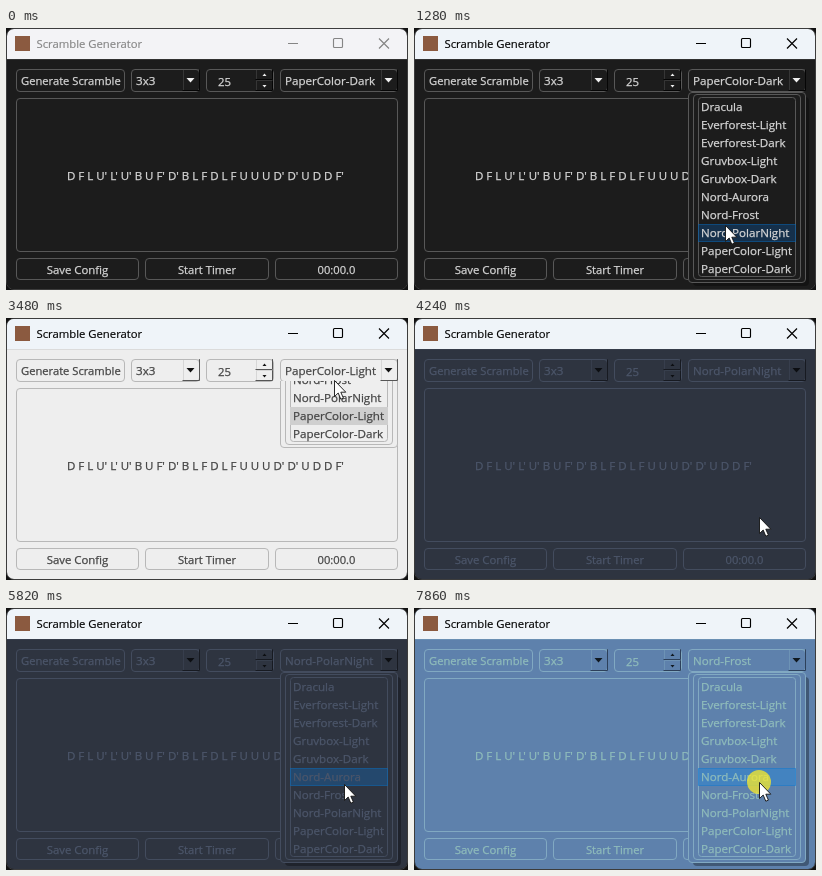
An HTML page for the animation above (8 s loop, 402 by 262 pixels).

```html
<!DOCTYPE html>
<html lang="en">
<head>
<meta charset="utf-8">
<title>Scramble Generator</title>
<style>
  html, body { margin: 0; width: 100%; height: 100%; overflow: hidden; background: #111; }
  svg { display: block; width: 402px; height: 262px; }
  text { font: 11.4px "Open Sans", "Noto Sans", sans-serif; fill: var(--text);
    stroke: var(--text); stroke-width: .25px; white-space: pre; }
  .combo { font-size: 11.6px; }
  .small { font-size: 11.2px; }
  .mid { text-anchor: middle; }
  .frame { fill: var(--bg); stroke: var(--border); }
  .bevel { fill: none; stroke: var(--bevel); }
  .arrow { fill: var(--arrow); }
  #caption { font-size: 11.3px; fill: var(--chrome); stroke: var(--chrome); stroke-width: .15px; }
  #controls { fill: none; stroke: var(--chrome); stroke-width: 1.15px; }
</style>
</head>
<body>
<svg id="stage" viewBox="0 0 402 262"></svg>
<script>
const LOOP = 8000;
const ITEMS = ["Dracula", "Everforest-Light", "Everforest-Dark", "Gruvbox-Light", "Gruvbox-Dark",
  "Nord-Aurora", "Nord-Frost", "Nord-PolarNight", "PaperColor-Light", "PaperColor-Dark"];
const ROW = 18, LIST_TOP = 70, POPUP_TOP = 64, POPUP_HEIGHT = 193, ROLL_MS = 145, FOCUS_AT = 730;

// hover: row under the pointer; current: selected row before the pointer reaches the list
const THEMES = [
  { at: 0, item: 9, bg: "#1c1c1c", text: "#d6d6d6", border: "#585858", bevel: "#050505", arrow: "#f0f0f0", hover: "#15304b", current: "#303030" },
  { at: 1830, item: 8, bg: "#eeeeee", text: "#444444", border: "#b8b8b8", bevel: "#555555", arrow: "#111111", hover: "#b5d5f0", current: "#cfcfcf" },
  { at: 4170, item: 7, bg: "#2e3440", text: "#4c566a", border: "#434c5e", bevel: "#171a21", arrow: "#0c0e12", hover: "#24486d", current: "#262b35" },
  { at: 6090, item: 6, bg: "#5e81ac", text: "#8fbcbb", border: "#81a9c2", bevel: "#2d405a", arrow: "#101820", hover: "#4383c0", current: "#4b698d" },
];
const POPUPS = [[940, 1830], [3430, 4170], [5210, 6090], [6840, LOOP]];
const PRESSES = [[730, 940], [1630, 1830], [3220, 3430], [3900, 4170], [5000, 5210],
  [5950, 6090], [6630, 6840], [7730, LOOP]];

// Pointer stops: time, x, y
const PATH = [
  [70, 400, 192], [400, 345, 53], [960, 345, 55], [1280, 311, 197], [1490, 328, 236],
  [1630, 334, 228], [1830, 334, 228], [2520, 352, 11], [2660, 352, 11], [3080, 328, 62],
  [3480, 328, 62], [3900, 345, 199], [4240, 345, 199], [4800, 340, 57], [5260, 340, 57],
  [5820, 338, 176], [5950, 338, 183], [6120, 338, 183], [6560, 324, 53], [6980, 324, 53],
  [7390, 343, 155], [7530, 344.5, 173.5], [LOOP, 344.5, 173.5],
];

const frame = (x, y, w, h, r = 3.5) =>
  `<rect class="frame" x="${x + .5}" y="${y + .5}" width="${w}" height="${h}" rx="${r}"/>`;
const label = (x, y, text, attrs = "") => `<text x="${x}" y="${y}" ${attrs}>${text}</text>`;
const button = (x, w, text, size = "") =>
  frame(x, 230, w, 21) + label(x + w / 2 + .5, 246, text, `class="mid ${size}"`);
const triangle = (x, y, w, h) =>
  `<path class="arrow" d="M${x - w / 2} ${y}h${w}l${-w / 2} ${h}z"/>`;
const bevel = (x, y, w, h) =>
  `<path class="bevel" d="M${x + w - .5} ${y}v${h - .5}h${-w}"/>
   <path d="M${x + .5} ${y + h - 1}v${1.5 - h}h${w - 1}" fill="none" stroke="var(--border)" opacity=".45"/>`;
const combo = (x, w, text, attrs = "") =>
  frame(x, 41, w, 22) + label(x + 5, 57, text, `class="combo" ${attrs}`) +
  bevel(x + w - 16, 41, 17, 22) + triangle(x + w - 8.5, 50, 8, 4.5);

const stage = document.getElementById("stage");
stage.innerHTML = `
  <clipPath id="window"><rect x="1" y="1" width="400" height="260" rx="7"/></clipPath>
  <clipPath id="below"><rect x="270" y="63" width="130" height="199"/></clipPath>
  <rect width="402" height="262" fill="#111"/>
  <rect x=".5" y=".5" width="401" height="261" rx="7.5" fill="none" stroke="#3c3c3c"/>
  <g clip-path="url(#window)">
    <rect width="402" height="262" style="fill:var(--bg)"/>
    <rect width="402" height="31" style="fill:var(--bar)"/>
    <path d="M1 31.5h400" stroke="var(--border)" opacity=".35"/>
    <rect id="maxHover" x="310" y="1" width="45" height="30" fill="#e2e7ec"/>
    <rect x="9" y="8" width="15" height="15" fill="#8b5a40"/>
    ${label(30.5, 20, "Scramble Generator", 'id="caption"')}
    <g id="controls">
      <path d="M282 15.5h10M373 10.5l10 10M383 10.5l-10 10"/>
      <rect x="327.5" y="10.5" width="9" height="9" rx="1"/>
    </g>
    ${frame(10, 41, 108, 22)}${label(15, 57, "Generate Scramble", 'class="small"')}
    ${combo(125, 68, "3x3")}
    ${frame(200, 41, 67, 22)}${label(212, 57.5, "25")}
    ${bevel(250, 41, 17, 11)}${bevel(250, 52, 17, 11)}
    ${triangle(258.5, 48, 4, -2.5)}${triangle(258.5, 57, 4, 2.5)}
    ${combo(274, 117, "", 'id="themeName"')}
    ${frame(10, 70, 381, 153)}
    ${label(61, 151.5, "D F L U' L' U' B U F' D' B L F D L F U U U D' D' U D D F'", 'style="font-size:11.5px"')}
    ${button(10, 122, "Save Config")}
    ${button(139, 123, "Start Timer", "small")}
    ${button(269, 122, "00:00.0", "small")}
  </g>
  <g id="popup" clip-path="url(#below)"><g id="sheet">
    <rect id="shadow" x="279" y="69" width="116" height="189" rx="4" opacity=".32"/>
    ${frame(274, POPUP_TOP, 117, 190)}${frame(279, 66, 107, 185)}${frame(284, 69, 97, 179, 3)}
    <rect id="highlight" x="284.5" width="97" height="17"/>
    ${ITEMS.map((name, i) => label(287, LIST_TOP + 13 + i * ROW, name, 'class="combo"')).join("")}
  </g></g>
  <g id="pointer">
    <circle id="press" r="12" fill="#faeb28" opacity=".75"/>
    <path d="M.5 .5V16.5L4.2 13L6.8 19.2L9.4 18.1L6.8 12.2H11.8Z" fill="#fff" stroke="#111" stroke-width=".9"/>
  </g>`;

const part = id => document.getElementById(id);
const show = (id, visible) => part(id).style.display = visible ? "" : "none";
const during = (spans, t) => spans.find(([from, to]) => t >= from && t < to);

function pointerAt(t) {
  const i = PATH.findIndex(stop => stop[0] > t);
  if (i < 1) return [420, 192];
  const [t0, x0, y0] = PATH[i - 1], [t1, x1, y1] = PATH[i];
  const u = (t - t0) / (t1 - t0), ease = u * u * (3 - 2 * u);
  return [x0 + (x1 - x0) * ease, y0 + (y1 - y0) * ease];
}

function draw(t) {
  const theme = THEMES.findLast(th => t >= th.at);
  const focused = t >= FOCUS_AT;
  const [x, y] = pointerAt(t);
  for (const key of ["bg", "text", "border", "bevel", "arrow"])
    stage.style.setProperty("--" + key, theme[key]);
  stage.style.setProperty("--bar", focused ? "#eff4f9" : "#f3f3f6");
  stage.style.setProperty("--chrome", focused ? "#000" : "#858585");
  part("themeName").textContent = ITEMS[theme.item];
  show("maxHover", y < 31 && x > 310 && x < 355);

  const popup = during(POPUPS, t);
  show("popup", popup);
  if (popup) {
    const roll = Math.min(1, (t - popup[0]) / ROLL_MS);
    const hovering = roll === 1 && y >= LIST_TOP;
    const row = hovering ? Math.min(9, Math.floor((y - LIST_TOP) / ROW)) : theme.item;
    const highlight = part("highlight");
    part("sheet").setAttribute("transform", `translate(0 ${Math.round((roll - 1) * POPUP_HEIGHT)})`);
    highlight.setAttribute("y", LIST_TOP + row * ROW + .5);
    highlight.setAttribute("fill", hovering ? theme.hover : theme.current);
    highlight.setAttribute("stroke", hovering ? "#0078d770" : theme.current);
    show("shadow", roll === 1);
  }

  show("press", during(PRESSES, t));
  part("pointer").setAttribute("transform", `translate(${Math.round(x)} ${Math.round(y)})`);
}

const start = performance.now();
function tick() {
  draw((performance.now() - start) % LOOP);
  requestAnimationFrame(tick);
}
tick();
</script>
</body>
</html>
```
